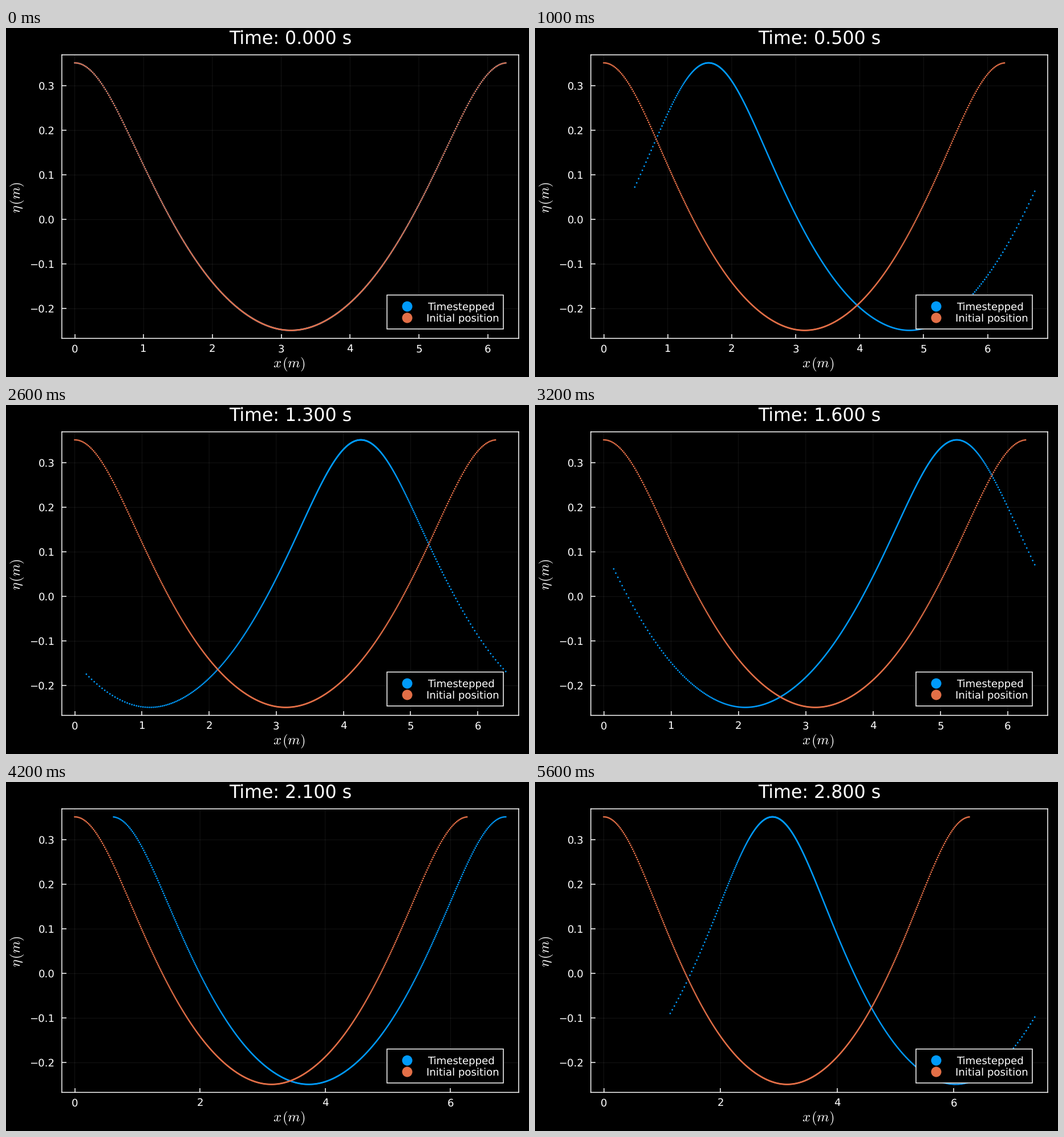
Recreate the animation shown at these times as a matplotlib script. Size 917 px wide and 611 px high, loop 5800 ms.

```python
import numpy as np
import matplotlib.pyplot as plt
from matplotlib.animation import FuncAnimation
from matplotlib.patches import Circle, Rectangle
from matplotlib.ticker import MultipleLocator
from matplotlib.transforms import Affine2D

W, H, DPI = 917, 611, 72          # at 72 dpi one point is one pixel
FRAMES, INTERVAL = 29, 200
DT, SUBSTEPS = 0.1, 20
N = 512
BLUE, ORANGE = "#009afa", "#e36f47"
LEFT, RIGHT, TOP, BOTTOM = 97.9, 898.9, 47, 543.4

plt.rcParams.update({
    "font.family": "DejaVu Sans",
    "mathtext.fontset": "cm",
    "text.color": "white",
    "text.hinting": "none",
    "path.snap": False,
    "axes.edgecolor": "white",
    "axes.linewidth": 1.5,
})

# Deep-water Stokes wave, wavenumber 1, steepness E
E, G = 0.3, 9.81
C = np.sqrt(G) * (1 + E**2 / 2 + E**4 / 8)
ETA = [E - 3 / 8 * E**3 - 422 / 384 * E**5,
       E**2 / 2 + E**4 / 3 + 1.3 * E**6,
       3 / 8 * E**3 + 297 / 384 * E**5,
       E**4 / 3,
       125 / 384 * E**5]
PHI = [E - E**3 / 2 - 37 / 24 * E**5, E**4 / 2, E**5 / 12]


def surface(q):
    return sum(a * np.cos(j * q) for j, a in enumerate(ETA, 1))


def drift(q):
    """Speed of a surface particle at phase q, seen from the crest."""
    z = surface(q)
    u = sum(j * a * np.exp(j * z) * np.cos(j * q) for j, a in enumerate(PHI, 1))
    return np.sqrt(G) * u - C


def rk4(q, h):
    k1 = drift(q)
    k2 = drift(q + h / 2 * k1)
    k3 = drift(q + h / 2 * k2)
    k4 = drift(q + h * k3)
    return q + h / 6 * (k1 + 2 * k2 + 2 * k3 + k4)


def start_points(n):
    """Surface points at equal steps of the velocity potential."""
    x = np.linspace(0, 2 * np.pi, 4001)
    slope = np.gradient(surface(x), x)
    rate = -drift(x) * (1 + slope**2)
    pot = np.concatenate([[0], np.cumsum(rate[1:] + rate[:-1])])
    return np.interp(np.arange(n) / n, pot / pot[-1], x)


x0 = start_points(N)
phases = [x0]
for _ in range(FRAMES - 1):
    q = phases[-1]
    for _ in range(SUBSTEPS):
        q = rk4(q, DT / SUBSTEPS)
    phases.append(q)

fig = plt.figure(figsize=((W + 1e-5) / DPI, (H + 1e-5) / DPI), dpi=DPI,
                 facecolor="black")
ax = fig.add_axes([LEFT / W, 1 - BOTTOM / H, (RIGHT - LEFT) / W, (BOTTOM - TOP) / H],
                  facecolor="black")
px = Affine2D().scale(1 / W, -1 / H).translate(0, 1) + fig.transFigure


def label(x, y, s, size, ha="center", **kw):
    return fig.text(x, y, s, transform=px, fontsize=size, ha=ha, va="baseline",
                    zorder=5, **kw)


def dots(x, color):
    # one colour per dot keeps their positions sub-pixel accurate
    return ax.scatter(x, surface(x0), s=2.8**2, c=[color] * N, linewidths=0, zorder=2)


ax.tick_params(direction="in", length=7.5, width=1.5, color="white",
               labelcolor="white", labelsize=18.1)
ax.tick_params(axis="x", pad=10.3)
ax.tick_params(axis="y", pad=12.7)
ax.set_axisbelow(True)
ax.grid(color="white", alpha=0.1, linewidth=0.8)
ax.yaxis.set_major_locator(MultipleLocator(0.1))
lo, hi = surface(np.pi), surface(0)
pad = 0.03 * (hi - lo)
ax.set_ylim(lo - pad, hi + pad)

moving = dots(x0, BLUE)
dots(x0, ORANGE)

title = label(498.8, 28, "", 31.6)
label(496.5, 594.5, r"$x\hspace{0.1}(m)$", 24.8)
label(25.7, 296.5, r"$\eta\hspace{0.1}(m)$", 24.8, rotation=90,
      rotation_mode="anchor")

fig.add_artist(Rectangle((668, 467.5), 204, 59.4, transform=px, facecolor="black",
                         edgecolor="white", linewidth=1.5, zorder=3))
for y, x, color, name in [(487.5, 739.3, BLUE, "Timestepped"),
                          (507.5, 736.7, ORANGE, "Initial position")]:
    fig.add_artist(Circle((703.5, y), 9, transform=px, facecolor=color,
                          linewidth=0, zorder=4))
    label(x, y + 6.6, name, 18.1, ha="left")


def update(i):
    t = i * DT
    q = phases[i]
    x = q + C * t
    moving.set_offsets(np.column_stack([x, surface(q)]))
    span = max(x.max(), x0.max())
    right = 1.03 * span
    ax.set_xlim(-0.03 * span, right)
    ax.xaxis.set_major_locator(MultipleLocator(2 if right >= 7 else 1))
    title.set_text(f"Time: {t:.3f} s")
    return moving, title


anim = FuncAnimation(fig, update, frames=FRAMES, interval=INTERVAL,
                     repeat=True, repeat_delay=0, blit=False)
plt.show()
```
